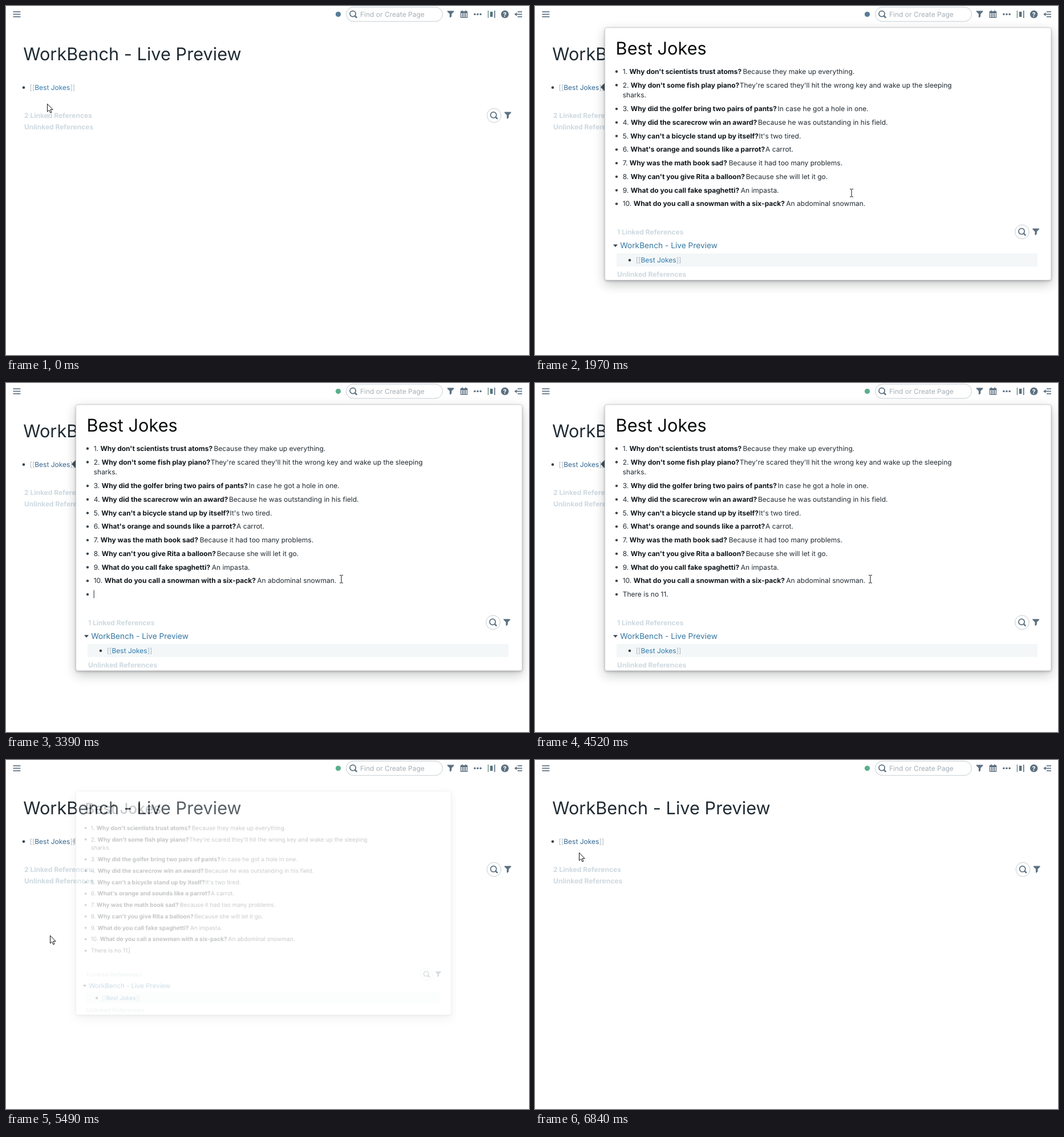
Animation, 917 px wide and 611 px high, one loop 7110 ms. Source, as an HTML page with a canvas:

```html
<!DOCTYPE html>
<html lang="en">
<head>
<meta charset="utf-8">
<title>Live Preview</title>
<style>
html, body { margin: 0; width: 100%; height: 100%; overflow: hidden; background: #fff; }
canvas { display: block; width: 917px; height: 611px; }
</style>
</head>
<body>
<canvas id="stage"></canvas>
<script>
const W = 917, H = 611, LOOP = 7110;
const dpr = window.devicePixelRatio || 1;

function surface(canvas) {
  canvas.width = W * dpr;
  canvas.height = H * dpr;
  const c = canvas.getContext('2d');
  c.scale(dpr, dpr);
  c.textRendering = 'geometricPrecision';
  return c;
}

const view = surface(document.getElementById('stage'));
const layer = surface(document.createElement('canvas'));
let ctx = view;

const INK = '#222b32', SLATE = '#5c7080', PALE = '#ced9e0', BRACKET = '#a9b6c0';
const LINK = '#2f7bb0', LINK_DIM = '#356890', EDGE = '#c3ccd2', BULLET = '#38444e';
const BASE = 12, TITLE = 30.72, SUBTITLE = 13.71;
const ROW = 23.75;

// question, answer, x of the answer
const JOKES = [
  ["Why don't scientists trust atoms?", 'Because they make up everything.', 364.5],
  ["Why don't some fish play piano?", "They're scared they'll hit the wrong key and wake up the sleeping", 358.7],
  ['Why did the golfer bring two pairs of pants?', 'In case he got a hole in one.', 425.5],
  ['Why did the scarecrow win an award?', 'Because he was outstanding in his field.', 391],
  ["Why can't a bicycle stand up by itself?", "It's two tired.", 392.5],
  ["What's orange and sounds like a parrot?", 'A carrot.', 404],
  ['Why was the math book sad?', 'Because it had too many problems.', 339.7],
  ["Why can't you give Rita a balloon?", 'Because she will let it go.', 369.7],
  ['What do you call fake spaghetti?', 'An impasta.', 360.7],
  ['What do you call a snowman with a six-pack?', 'An abdominal snowman.', 440.3]
];

// bursts of picture changes: first, last, count
const BURSTS = [
  [0, 0, 1], [390, 670, 5], [940, 940, 1], [1340, 2040, 11], [2110, 2380, 4],
  [2840, 2840, 1], [3190, 3390, 3], [3720, 3790, 2], [4010, 4140, 2],
  [4520, 4520, 1], [4790, 5490, 11], [5560, 6240, 11], [6310, 6840, 8]
];

// pointer: time, x, y, eased arrival
const PATH = [
  [0, 72, 171], [320, 72, 171], [670, 75, 145, 1], [1270, 75, 145],
  [2040, 566, 331, 1], [2380, 588, 343], [4720, 588, 343],
  [5490, 77, 307, 1], [5965, 76, 213], [6240, 77, 179], [6840, 77, 162], [LOOP, 77, 162]
];

const TYPED = [[3720, 'There'], [3790, 'There is'], [4010, 'There is no'], [4140, 'There is no 11.']];

function snap(t) {
  const [a, b, n] = BURSTS.filter(s => s[0] <= t + 1).pop();
  if (n === 1) return a;
  const step = (b - a) / (n - 1);
  return a + Math.min(n - 1, Math.floor((t - a + 1) / step)) * step;
}

function pointerAt(t) {
  const i = Math.max(1, PATH.findIndex(p => p[0] >= t));
  const a = PATH[i - 1], b = PATH[i];
  let p = (t - a[0]) / (b[0] - a[0]);
  if (b[3]) p = p * p * (3 - 2 * p);
  return [a[1] + (b[1] - a[1]) * p, a[2] + (b[2] - a[2]) * p];
}

function text(str, x, y, color = INK, weight = 400, size = BASE) {
  const k = size / BASE;
  ctx.save();
  ctx.translate(x, y);
  ctx.scale(k, k);
  ctx.font = `${weight} ${BASE}px Inter, "Liberation Sans", sans-serif`;
  ctx.fillStyle = color;
  ctx.fillText(str, 0, 0);
  const w = ctx.measureText(str).width * k;
  ctx.restore();
  return x + w;
}

function line(color, width, ...pts) {
  ctx.beginPath();
  for (let i = 0; i < pts.length; i += 2) ctx.lineTo(pts[i], pts[i + 1]);
  ctx.strokeStyle = color;
  ctx.lineWidth = width;
  ctx.stroke();
}

function poly(color, ...pts) {
  ctx.beginPath();
  for (let i = 0; i < pts.length; i += 2) ctx.lineTo(pts[i], pts[i + 1]);
  ctx.closePath();
  ctx.fillStyle = color;
  ctx.fill();
}

function rect(color, x, y, w, h) {
  ctx.fillStyle = color;
  ctx.fillRect(x, y, w, h);
}

function dot(color, x, y, r) {
  ctx.beginPath();
  ctx.arc(x, y, r, 0, 7);
  ctx.fillStyle = color;
  ctx.fill();
}

function ring(color, width, x, y, r) {
  ctx.beginPath();
  ctx.arc(x, y, r, 0, 7);
  ctx.strokeStyle = color;
  ctx.lineWidth = width;
  ctx.stroke();
}

function lens(x, y) {
  ring(SLATE, 1.75, x - 0.9, y - 0.9, 5.1);
  line(SLATE, 2.4, x + 2.7, y + 2.7, x + 5.6, y + 5.6);
  dot(SLATE, x + 5.5, y + 5.5, 1.25);
}

function funnel(x, y) {
  poly(SLATE, x - 5.5, y - 6, x + 5.5, y - 6, x + 6, y - 5.2, x + 5.7, y - 4.5, x + 1.7, y - 0.5,
    x + 1.7, y + 3.7, x - 0.5, y + 5.8, x - 1.7, y + 5.3, x - 1.7, y - 0.5, x - 5.7, y - 4.5, x - 6, y - 5.2);
}

function finder(x, y) {
  ring(EDGE, 1, x, y, 12.3);
  lens(x, y);
  funnel(x + 24.2, y);
}

function pageLink(x, y, color, underline) {
  const a = text('[[', x, y, BRACKET);
  const b = text('Best Jokes', a, y, color);
  text(']]', b, y, BRACKET);
  if (underline) rect(color, a, y + 1.5, b - a, 1);
}

function toolbar(saved) {
  for (const y of [10.2, 14.5, 18.8]) line(SLATE, 1.7, 12.4, y, 25.4, y);
  dot(saved ? '#5aae8d' : '#587c98', 582.5, 14.5, 4.6);

  ctx.beginPath();
  ctx.roundRect(596.5, 2, 169, 25, 12.5);
  ctx.strokeStyle = EDGE;
  ctx.lineWidth = 1;
  ctx.stroke();
  lens(609, 14.5);
  text('Find or Create Page', 621, 18.8, '#a5afb7');
  funnel(779.6, 14.5);

  rect(SLATE, 796.7, 9.2, 12.6, 11.4);
  rect(SLATE, 799, 7.7, 1.8, 3);
  rect(SLATE, 805.2, 7.7, 1.8, 3);
  for (let i = 0; i < 6; i++) rect('#fff', 797.9 + (i % 3) * 3.9, 12.8 + (i > 2) * 3.5, 2.5, 2.5);

  for (const x of [821.9, 827, 832.1]) dot(SLATE, x, 14.5, 1.75);

  rect('#6c9a88', 844.7, 8, 1.6, 13);
  rect(SLATE, 848.8, 10, 4.6, 9);
  rect(SLATE, 856, 8, 1.6, 13);

  dot(SLATE, 874.7, 14.5, 6.8);
  text('?', 871.5, 18.5, '#fff', 700, 11);

  for (const y of [10.2, 14.5, 18.8]) line(SLATE, 1.7, y === 14.5 ? 894 : 897, y, 905, y);
  poly(SLATE, 891.3, 14.5, 895.5, 11.2, 895.5, 17.8);
}

function page(t, hover, y) {
  text('WorkBench - Live Preview', 30.2, 94.6, '#202b33', 400, TITLE);
  dot(BULLET, 31, 142.8, 2.3);
  pageLink(41.5, 147, t < 1340 ? LINK : LINK_DIM, hover);
  text('2 Linked References', 32, 196, PALE, 700);
  text('Unlinked References', 32, 216.3, PALE, 700);
  if (t < 1340) rect('#dfe5e9', 73, 185, 1, 13);
  if (t > 5560 && y > 203 && y < 222) poly('#e6ebee', 21.5, 210.5, 26.5, 210.5, 24, 213.5);
  finder(855.6, 191.6);
}

function panel(height) {
  const shadow = (blur, dy) => {
    ctx.save();
    ctx.shadowColor = 'rgba(16,22,26,.24)';
    ctx.shadowBlur = blur * dpr;
    ctx.shadowOffsetY = dy * dpr;
    ctx.fill();
    ctx.restore();
  };
  poly('#45555f', 115, 142, 122.5, 134.5, 122.5, 149.5);
  ctx.beginPath();
  ctx.roundRect(122.5, 38, 782.5, height, 3);
  ctx.fillStyle = '#fff';
  shadow(20, 7);
  shadow(4, 1.5);
  ctx.strokeStyle = 'rgba(16,22,26,.16)';
  ctx.lineWidth = 1;
  ctx.stroke();
}

function preview(t) {
  const grown = t >= 3190, editing = t >= 2290 && !grown;
  const shift = grown ? ROW : 0;
  panel(442 + shift);
  text('Best Jokes', 141.6, 85.2, '#080a0b', 400, TITLE);

  let y = 118.8;
  JOKES.forEach(([question, answer, x], i) => {
    dot(BULLET, 143, y - 4, 2.2);
    const n = `${i + 1}. `;
    if (i === 9 && editing) {
      const end = text(`${n}**${question}** ${answer}`, 153.7, y);
      if (t < 2840) rect(INK, end + 0.5, y - 11.5, 1, 14);
    } else {
      const start = text(n, 153.7, y);
      text(question, start, y, '#11171b', 700);
      text(answer, x, y);
    }
    if (i === 1) text('sharks.', 153.7, y += 17.8);
    y += ROW;
  });

  if (grown) {
    dot(BULLET, 143, y - 4, 2.2);
    const typed = TYPED.filter(s => s[0] <= t + 1).pop();
    const end = text(typed ? typed[1] : '', 153.7, y);
    if (t < 4520 || t > 5050) rect(INK, end, y - 11.5, 1, 14);
  }

  ctx.save();
  ctx.translate(0, shift);
  text('1 Linked References', 144, 399.8, PALE, 700);
  finder(854, 395.4);
  poly(BULLET, 137, 417.6, 145, 417.6, 141, 422);
  text('WorkBench - Live Preview', 149.2, 424.4, '#33769f', 400, SUBTITLE);
  rect('#f3f7f8', 143, 433, 738, 23.3);
  dot(BULLET, 166, 445, 2.3);
  pageLink(176.7, 449.2, LINK);
  text('Unlinked References', 144, 474.3, PALE, 700);
  ctx.restore();
}

// Shrinks and fades the whole preview as one picture, towards its arrow.
function fadingPreview(t, fade) {
  const k = 1 - 0.213 * fade;
  ctx = layer;
  ctx.clearRect(0, 0, W, H);
  preview(t);
  ctx = view;
  ctx.save();
  ctx.globalAlpha = 1 - fade;
  ctx.imageSmoothingQuality = 'high';
  ctx.translate(122, 142);
  ctx.scale(k, k);
  ctx.drawImage(layer.canvas, -122, -142, W, H);
  ctx.restore();
}

function outline(d, width = 1) {
  const shape = new Path2D(d);
  ctx.fillStyle = '#fff';
  ctx.fill(shape);
  ctx.strokeStyle = '#111';
  ctx.lineWidth = width;
  ctx.lineJoin = 'round';
  ctx.stroke(shape);
}

function pointer(kind, x, y) {
  ctx.save();
  ctx.translate(Math.round(x), Math.round(y));
  if (kind === 'beam') {
    rect('#111', -0.5, -6, 1, 13);
    for (const ey of [-7, 6.5]) {
      rect('#111', -3, ey, 2.5, 1);
      rect('#111', 0.5, ey, 2.5, 1);
    }
  } else if (kind === 'hand') {
    outline('M-1.2 9V.4Q0-1.6 1.3.4V6.2Q2.6 4.6 4 6.3Q5.4 5.2 6.6 6.8Q8.6 6.3 8.8 8.4V11.5' +
      'Q8.6 13.5 7.4 14.6V16.5H-.2V15Q-2.4 12.6-4.2 9.8Q-4.6 8-2.8 8.2Z', 1.1);
    for (const fx of [1.3, 4, 6.6]) line('#111', 0.8, fx, 6.3, fx, 9);
  } else {
    outline('M.5.3V14L3.7 11.2 5.9 16 8 15.1 5.9 10.4H10.1Z');
  }
  ctx.restore();
}

function draw(now) {
  const t = snap(now % LOOP);
  const [x, y] = pointerAt(t);
  const open = t >= 940 && t < 5510;
  const hover = x < 113 && y > 136 && y < 152;
  const fade = Math.max(0, (t - 5420.5) / 93);

  rect('#fff', 0, 0, W, H);
  page(t, hover, y);
  toolbar(t >= 3190);
  if (open && fade) fadingPreview(t, fade);
  else if (open) preview(t);

  const overText = open && !fade && x > 140;
  pointer(hover ? 'hand' : overText ? 'beam' : 'arrow', x, y);
}

const begin = performance.now();
function tick() {
  draw(performance.now() - begin);
  requestAnimationFrame(tick);
}
tick();
</script>
</body>
</html>
```
